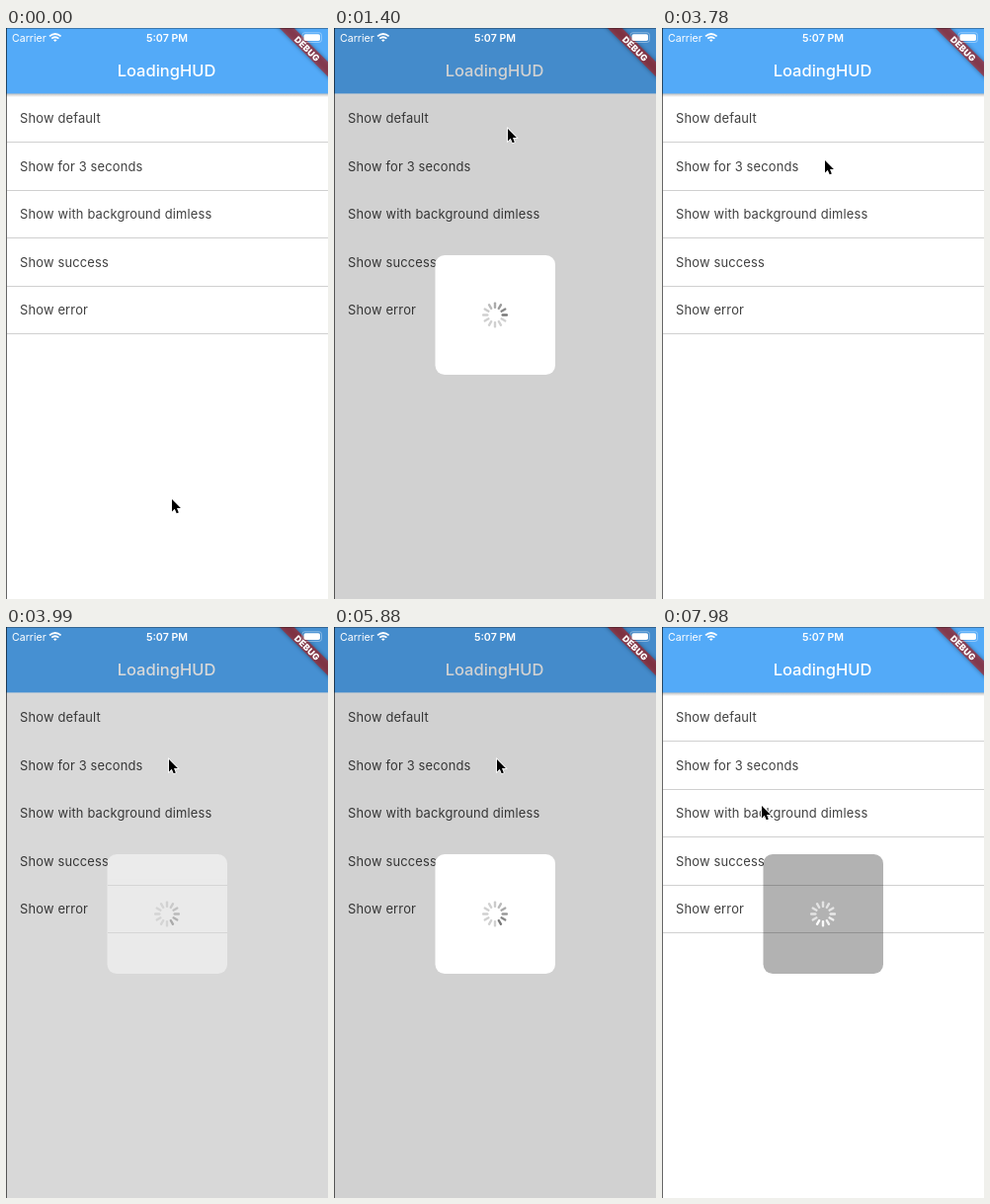
These frames come from a looping animation (326 px wide and 578 px high, 8 s). An HTML page:

```html
<!DOCTYPE html>
<html lang="en">
<head>
<meta charset="utf-8">
<title>LoadingHUD</title>
<style>
  html, body { margin: 0; width: 100%; height: 100%; overflow: hidden; background: #fff; }
  svg { display: block; width: 326px; height: 578px; font-family: Inter, Roboto, sans-serif; }
  .row { font-size: 12.9px; letter-spacing: .17px; fill: #404040; }
  .status { font-size: 10.6px; fill: #fff; }
</style>
</head>
<body>
<svg viewBox="0 0 326 578">
  <defs>
    <linearGradient id="shade" x2="0" y2="1">
      <stop stop-opacity=".28"/>
      <stop offset="1" stop-opacity="0"/>
    </linearGradient>
    <filter id="blur" x="-20%" y="-60%" width="140%" height="220%"><feGaussianBlur stdDeviation="2"/></filter>
  </defs>

  <rect width="326" height="578" fill="#fff"/>
  <rect id="shadow" y="66" width="326" height="4" fill="url(#shade)"/>
  <rect width="326" height="66.4" fill="#53aaf8"/>
  <text x="162.5" y="49" text-anchor="middle" font-size="16.5" font-weight="500" fill="#fff">LoadingHUD</text>
  <g id="rows"></g>
  <path id="lines" stroke="#d0d0d0"/>

  <rect id="dim" width="326" height="578"/>
  <g id="hud">
    <rect id="panel" x="102.5" y="230" width="121.5" height="121" rx="9.5"/>
    <g id="spinner" transform="translate(163 290.5)"></g>
  </g>

  <!-- corner ribbon -->
  <g transform="translate(326 0) rotate(45)">
    <rect x="-50" y="24.3" width="100" height="10.5" opacity=".4" filter="url(#blur)"/>
    <rect x="-50" y="24.3" width="100" height="10.5" fill="#b71c1c" opacity=".6"/>
    <text y="33.2" text-anchor="middle" font-size="8.9" font-weight="900" letter-spacing=".2" fill="#fff">DEBUG</text>
  </g>

  <!-- status bar -->
  <text class="status" x="6" y="14">Carrier</text>
  <text class="status" x="163" y="14" text-anchor="middle" font-weight="600">5:07 PM</text>
  <g fill="none" stroke="#fff" stroke-width="1.7">
    <path d="M44 8.4Q49.8 3.6 55.6 8.4M46.2 10.7Q49.8 7.8 53.4 10.7"/>
    <path d="M49.8 14L48 12.2Q49.8 10.8 51.6 12.2Z" fill="#fff" stroke="none"/>
  </g>
  <rect x="300" y="4.7" width="19.5" height="9.8" rx="2.6" fill="none" stroke="#fff" stroke-opacity=".35"/>
  <rect x="301.5" y="6.2" width="16.5" height="6.8" rx="1.8" fill="#fff"/>

  <path d="M.5 0V578" stroke="#000" stroke-opacity=".6"/>
  <path d="M0 .5H326" stroke="#000" stroke-opacity=".3"/>
  <path id="cursor" d="M0 0V12.4L2.8 9.8L4.7 14.3L6.8 13.4L5 9H8.9Z" stroke="#fff" stroke-width="1.6" paint-order="stroke"/>
</svg>
<script>
const $ = id => document.getElementById(id);
const NS = 'http://www.w3.org/2000/svg';
const LOOP = 8000, STEP = 70, FADE = 200, SPIN = 920;

// fade-in start, fade-out start, and the leading spoke at a known time
const shows = [
  { start: 1150, end: 3000, at: 2590, head: 4.5, fill: '#fff', dim: .18, opacity: 1 },
  { start: 3896, end: 7048, at: 3990, head: 2.1, fill: '#fff', dim: .18, opacity: 1 },
  { start: 7890, end: 9999, at: 7980, head: 4.5, fill: '#000', dim: 0, opacity: .67, light: true }
];

// time, x, y of the pointer tip
const path = [
  [0, 168, 477], [700, 176, 103], [840, 176, 103], [1050, 176, 102], [1750, 176, 102],
  [2400, 171, 129], [3290, 166, 132], [3430, 165, 134], [6800, 165, 134],
  [7210, 123, 168], [7560, 101, 181], [LOOP, 101, 181]
];

const add = (parent, tag, attrs) => {
  const el = document.createElementNS(NS, tag);
  for (const k in attrs) el.setAttribute(k, attrs[k]);
  return parent.appendChild(el);
};
const set = (id, k, v) => $(id).setAttribute(k, v);
const clamp = x => Math.min(1, Math.max(0, x));

const labels = ['Show default', 'Show for 3 seconds', 'Show with background dimless', 'Show success', 'Show error'];
labels.forEach((label, i) => {
  add($('rows'), 'text', { class: 'row', x: 14, y: 96 + i * 48.6 }).textContent = label;
});
const lineYs = labels.map((_, i) => Math.floor(115.4 + i * 48.6) + .5);
const spokes = Array.from({ length: 12 }, (_, i) => add($('spinner'), 'rect', {
  x: 6.5, y: -1.2, width: 6.5, height: 2.4, rx: 1, transform: `rotate(${i * 30})`
}));

function pointer(t) {
  const i = path.findIndex(p => p[0] > t), [t0, x0, y0] = path[i - 1], [t1, x1, y1] = path[i];
  const u = (t - t0) / (t1 - t0), e = u * u * (3 - 2 * u);
  return `translate(${x0 + (x1 - x0) * e} ${y0 + (y1 - y0) * e})`;
}

function draw(t) {
  const s = shows.find(s => t >= s.start && t < s.end + FADE);
  const fade = s ? clamp((t - s.start) / FADE) * (1 - clamp((t - s.end) / FADE)) : 0;
  const dim = s ? s.dim * (1 - (1 - fade) ** 2.9) : 0;
  const faint = dim > .11;

  set('cursor', 'transform', pointer(t));
  set('dim', 'opacity', dim);
  set('shadow', 'opacity', faint ? 0 : 1);
  // under the full dim the dividers only show through the panel
  set('lines', 'd', faint
    ? lineYs.filter(y => y > 230).map(y => `M103 ${y}H224`).join('')
    : lineYs.map(y => `M1 ${y}H326`).join(''));
  set('hud', 'opacity', fade);
  if (!s) return;

  set('panel', 'fill', s.fill);
  set('panel', 'opacity', s.opacity);
  set('spinner', 'fill', s.light ? '#fff' : '#000');
  const head = Math.floor(s.head + (t - s.at) * 12 / SPIN);
  spokes.forEach((spoke, i) => {
    const lag = (((head - i) % 12) + 12) % 12;
    const alpha = Math.max(47, 135 - 16.6 * lag) / 255;
    spoke.setAttribute('opacity', s.light ? Math.min(1, .45 + alpha) : alpha);
  });
}

const begin = performance.now();
function tick() {
  const t = (performance.now() - begin) % LOOP;
  draw(Math.floor(t / STEP) * STEP);
  requestAnimationFrame(tick);
}
tick();
</script>
</body>
</html>
```
